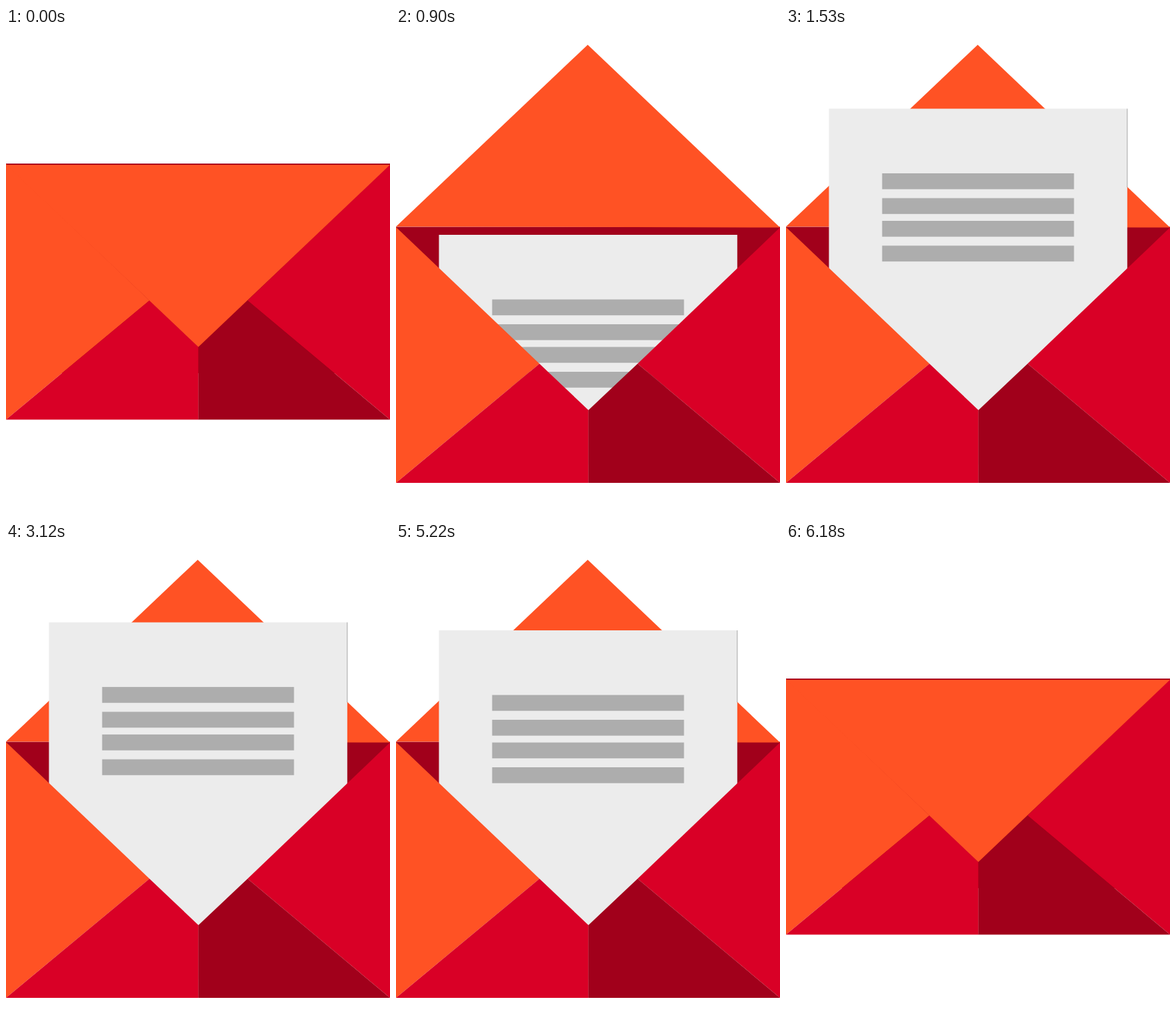
An HTML page that plays this animation: 550 by 697 pixels, repeating every 6420 ms.

```html
<!DOCTYPE html>
<html lang="en">
<head>
<meta charset="utf-8">
<title>Envelope</title>
<style>
  html, body { margin: 0; width: 100%; height: 100%; overflow: hidden; background: #fff; }
  svg { display: block; width: 100%; height: 100%; }
</style>
</head>
<body>
<svg viewBox="0 0 550 697">
  <rect id="back" width="550" height="300" fill="#a1001b"/>
  <polygon id="flapUp" fill="#ff5224"/>
  <g id="paper">
    <rect id="sheet" x="61.5" width="427.3" fill="#ececec"/>
    <path id="edge" stroke="#8a8a8a" stroke-width=".7"/>
    <path id="rim" d="M61.5 -.5H489" stroke="#f8f8f8"/>
    <g id="bars" fill="#adadad"></g>
  </g>
  <g id="front">
    <polygon points="0,0 205.5,195.5 0,366" fill="#ff5224"/>
    <polygon points="550,.5 346,195.5 550,366" fill="#d90026"/>
    <polygon points="0,366 205.5,195.5 275.7,262 275.7,366" fill="#d90026"/>
    <polygon points="550,366 346,195.5 275.5,262 275.5,366" fill="#a1001b"/>
  </g>
  <polygon id="flapDown" fill="#ff5224"/>
</svg>
<script>
const LOOP = 6420, STEP = 30, OPEN_Y = 285, LIFT = 90.5;
const $ = id => document.getElementById(id);
const set = (id, attrs) => {
  for (const k in attrs) $(id).setAttribute(k, attrs[k]);
};
const clamp = x => Math.min(1, Math.max(0, x));
const span = (t, a, b) => clamp((t - a) / (b - a));
const smooth = u => u * u * (3 - 2 * u);
const sineOut = u => Math.sin(u * Math.PI / 2);
const mix = (a, b, u) => a + (b - a) * u;

$('bars').innerHTML = [92.5, 128, 160.5, 196]
  .map(y => `<rect x="137.7" y="${y}" width="274.8" height="22.7"/>`).join('');

// Top edge of the letter
function paperY(t, base) {
  if (t < 900) return base + 11;
  if (t < 3090) return mix(296, 115.5, sineOut(span(t, 900, 1530)));
  if (t < 3240) return mix(115.5, 97, smooth(span(t, 3090, 3240)));
  if (t < 5220) return mix(97, 125, smooth(span(t, 3240, 3480)));
  const fall = (Math.min(t, 5880) - 5210) / 640;
  return 125 + 198 * Math.pow(fall, 2.28) + base - OPEN_Y;
}

function draw(t) {
  const open = t < 3000 ? span(t, 330, 900) : 1 - span(t, 5850, 6180);
  const base = OPEN_Y - LIFT * Math.cos(open * Math.PI / 2);
  const turn = Math.cos(Math.PI * smooth(open));
  const up = turn < 0;
  const tip = base + turn * (up ? 261 : 262);
  const hinge = base + (up ? 0 : 1.3 * turn);
  const flap = `0,${hinge - (up ? .8 : 0)} ${up ? 274.6 : 275.5},${tip} 550,${hinge + (up ? .6 : 0)}`;
  const y = paperY(t, base);

  set('back', { y: base - .5 });
  set('front', { transform: `translate(0 ${base})` });
  set('flapUp', { points: up ? flap : '' });
  set('flapDown', { points: up ? '' : flap });
  set('paper', { transform: `translate(0 ${y})`, visibility: open > 0 ? 'visible' : 'hidden' });
  set('sheet', { height: Math.max(0, base + 340 - y) });
  set('edge', { d: y < 228 ? `M488.8 0V${228 - y}` : '' });
  set('rim', { visibility: t >= 3480 && t < 5220 ? 'inherit' : 'hidden' });
}

const start = performance.now();
function tick() {
  const t = (performance.now() - start) % LOOP;
  draw(Math.floor(t / STEP) * STEP);
  requestAnimationFrame(tick);
}
tick();
</script>
</body>
</html>
```
